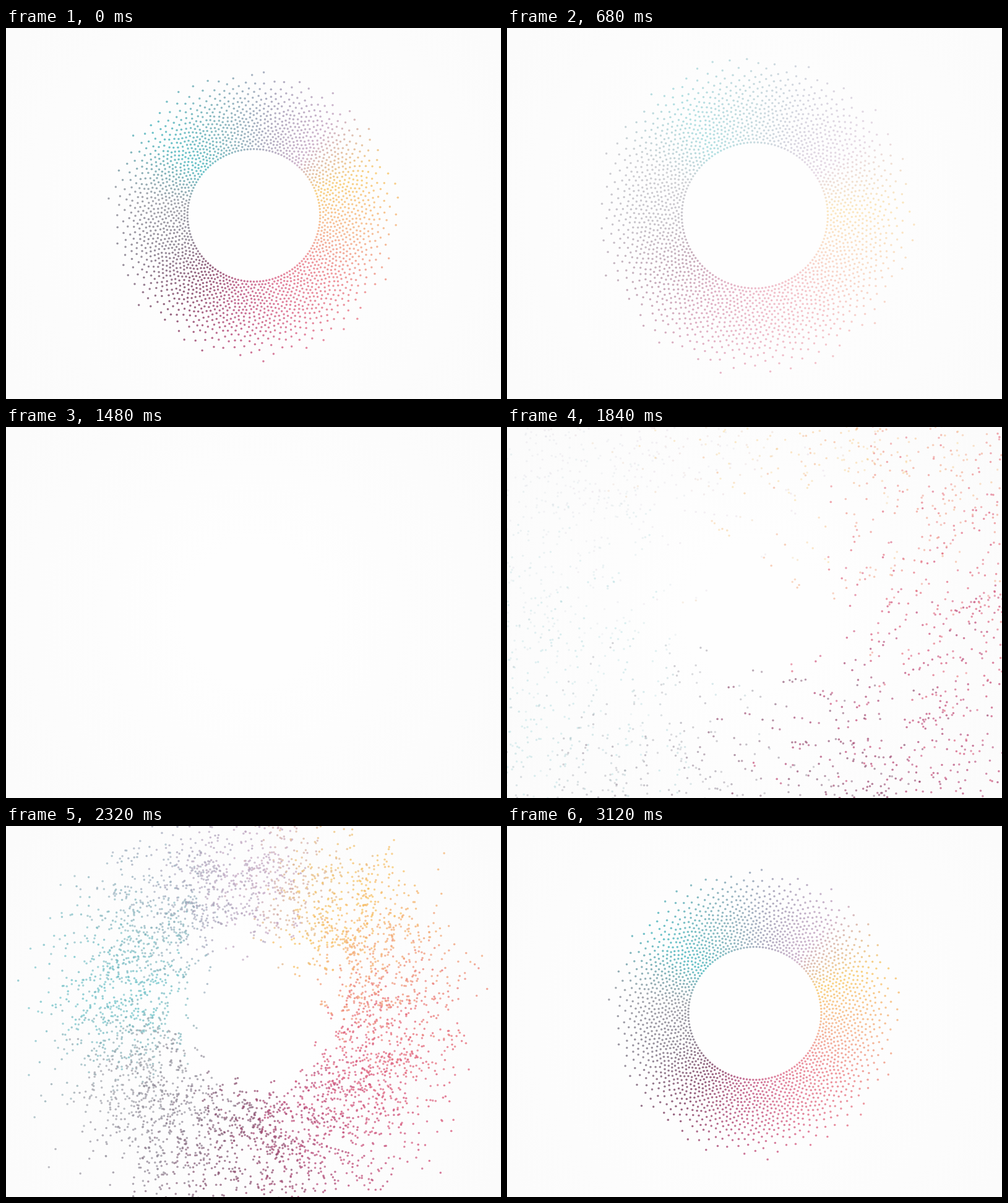
These frames come from a looping animation (800x600 px, 3.16 s). An HTML page with a canvas:

```html
<!DOCTYPE html>
<html lang="en">
<head>
<meta charset="utf-8">
<title>Dot ring</title>
<style>
  html, body { margin: 0; width: 100%; height: 100%; overflow: hidden; background: #fcfcfc; }
  canvas { display: block; }
</style>
</head>
<body>
<canvas id="stage" width="800" height="600"></canvas>
<script>
const ctx = document.getElementById('stage').getContext('2d');
const LOOP = 3160, STEP = 40, TAU = Math.PI * 2;
const CX = 400.5, CY = 303, INNER = 108.5, OUTER = 240, DOT = 1.75;
const APPEAR = -1680, VANISH = 1020;
const rad = deg => deg * Math.PI / 180;

let seed = 20177;
function random() {
  seed = (seed + 0x6D2B79F5) | 0;
  let n = Math.imul(seed ^ seed >>> 15, 1 | seed);
  n = n + Math.imul(n ^ n >>> 7, 61 | n) ^ n;
  return ((n ^ n >>> 14) >>> 0) / 4294967296;
}
const gauss = () => Math.sqrt(-2 * Math.log(1 - random())) * Math.cos(TAU * random());

// Twelve hues, 30 degrees apart, clockwise from 20 degrees above the right.
const HUES = ['f7c560', 'f3a878', 'e8707c', 'd85c80', 'b84c7a', '84496a',
  '8c8492', '9ea0a8', '62c0c6', '84b4bc', 'a6a2b8', 'c4a4c2']
  .map(hex => [0, 2, 4].map(i => parseInt(hex.slice(i, i + 2), 16)));

function ringColor(angle) {
  const place = ((angle - rad(-20)) / TAU * 12 + 24) % 12;
  const i = Math.floor(place), from = HUES[i], to = HUES[(i + 1) % 12];
  return `rgb(${from.map((c, k) => Math.round(c + (to[k] - c) * (place - i)))})`;
}

const dots = [];
function addDot(r, angle) {
  dots.push({
    x: r * Math.cos(angle), y: r * Math.sin(angle), r, angle,
    color: ringColor(angle), dx: gauss(), dy: gauss()
  });
}

// Dots are added from the inside out, so only the newest can be too close.
function isFree(r, angle, gap) {
  const x = r * Math.cos(angle), y = r * Math.sin(angle);
  for (let i = dots.length - 1; i >= 0 && r - dots[i].r < gap; i--) {
    if (Math.hypot(dots[i].x - x, dots[i].y - y) < gap) return false;
  }
  return true;
}

function buildRing() {
  const first = 132;
  for (let i = 0; i < first; i++) addDot(INNER, TAU * i / first);
  for (let r = INNER + 2; r < OUTER; r += 0.4) {
    const depth = (r - INNER) / 130;
    const spacing = 5 + 1.8 * depth + 14 * depth ** 5;
    for (let n = 0; n < 250; n++) {
      const angle = random() * TAU;
      const gap = spacing * (1 + 0.5 * depth * (random() - 0.3));
      if (isFree(r, angle, gap)) addDot(r, angle);
    }
  }
}

function smooth(from, to, t) {
  const u = Math.min(1, Math.max(0, (t - from) / (to - from)));
  return u * u * (3 - 2 * u);
}

// The ring shrinks to its smallest size at 260 ms, then bursts outward.
function scaleAt(t) {
  const s = t - 260, q = s / 740;
  return 0.983 + (s < 0 ? 0.035 * q ** 2 + 0.07 * q ** 4 : 0.105 * (s / 420) ** 2.2);
}
function turnAt(t) {
  const s = t / 1000;
  return rad(31 * s - 11 * s * s);
}
const spreadAt = t => 68 * Math.max(0, (-500 - t) / 620) ** 1.5;

// Brightness varies around the ring, along an axis 30 degrees below the right.
function opacityAt(t) {
  const early = 1 - smooth(-1120, -700, t);
  const dip = Math.exp(-(((t + 520) / 260) ** 2));
  const fade = smooth(APPEAR, -1120, t) * (1 - smooth(350, VANISH, t));
  const base = 0.84 - 0.24 * early - 0.3 * dip;
  const bias = 0.54 * early - 0.1 - 0.2 * dip;
  return angle => Math.min(1, Math.max(0, fade * (base + bias * Math.cos(angle - rad(30)))));
}

function drawDots(t) {
  const scale = scaleAt(t), turn = turnAt(t), spread = spreadAt(t), opacity = opacityAt(t);
  for (const dot of dots) {
    const angle = dot.angle + turn;
    ctx.globalAlpha = opacity(angle);
    ctx.fillStyle = dot.color;
    ctx.beginPath();
    ctx.arc(CX + dot.r * scale * Math.cos(angle) + dot.dx * spread,
            CY + dot.r * scale * Math.sin(angle) + dot.dy * spread, DOT, 0, TAU);
    ctx.fill();
  }
}

const backdrop = ctx.createRadialGradient(CX, CY, 110, CX, CY, 480);
backdrop.addColorStop(0, '#fefefe');
backdrop.addColorStop(1, '#fbfbfb');

function draw(time) {
  const t = time < 1240 ? time : time - LOOP;
  ctx.globalAlpha = 1;
  ctx.fillStyle = backdrop;
  ctx.fillRect(0, 0, 800, 600);
  if (t <= APPEAR || t >= VANISH) return;
  // While scattered, every dot leaves an echo of the step before.
  if (spreadAt(t) > 8) drawDots(t - STEP);
  drawDots(t);
}

function tick() {
  draw(Math.floor(performance.now() % LOOP / STEP) * STEP);
  requestAnimationFrame(tick);
}
buildRing();
tick();
</script>
</body>
</html>
```
